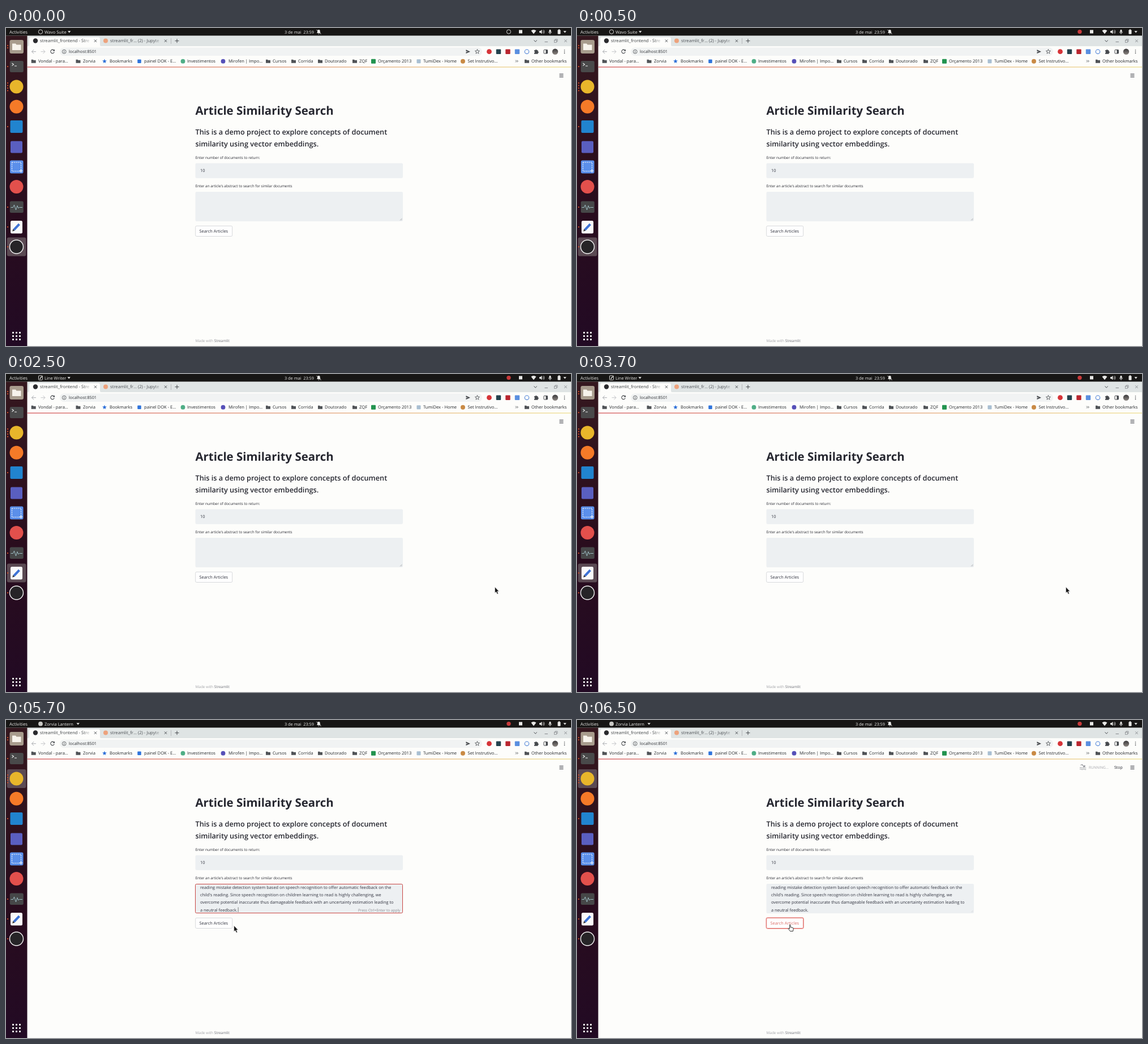
Animation, 998 px wide and 561 px high, one loop 8 s. Source, as an HTML page:

```html
<!DOCTYPE html>
<html lang="en">
<head>
<meta charset="utf-8">
<title>Article Similarity Search</title>
<style>
html, body { margin: 0; width: 100%; height: 100%; overflow: hidden; background: #fdfdfb; }
svg { display: block; width: 100vw; height: 100vh; }
text { font-family: "Open Sans", "Noto Sans", sans-serif; white-space: pre; text-rendering: geometricPrecision; }
</style>
</head>
<body>
<svg id="stage" viewBox="0 0 998 561" preserveAspectRatio="none">
  <defs>
    <linearGradient id="dock" x2="0" y2="1">
      <stop stop-color="#35181f"/><stop offset=".5" stop-color="#2a0d1d"/><stop offset="1" stop-color="#220a24"/>
    </linearGradient>
    <linearGradient id="deco"><stop stop-color="#d0464a"/><stop offset="1" stop-color="#eedd86"/></linearGradient>
    <linearGradient id="photo" x2="0" y2="1"><stop stop-color="#3b3a3c"/><stop offset="1" stop-color="#8b8580"/></linearGradient>
    <linearGradient id="fadeA" gradientUnits="userSpaceOnUse" x1="136" x2="150">
      <stop stop-color="#3c4043"/><stop offset="1" stop-color="#3c4043" stop-opacity="0"/>
    </linearGradient>
    <linearGradient id="fadeB" gradientUnits="userSpaceOnUse" x1="261" x2="275">
      <stop stop-color="#4b4f54"/><stop offset="1" stop-color="#4b4f54" stop-opacity="0"/>
    </linearGradient>
    <clipPath id="area"><rect x="335" y="289.5" width="365.5" height="51"/></clipPath>
  </defs>
</svg>
<script>
const stage = document.getElementById("stage");
let layer = stage;

function add(tag, attrs, content) {
  const el = document.createElementNS(stage.namespaceURI, tag);
  for (const k in attrs) el.setAttribute(k, attrs[k]);
  if (content) el.textContent = content;
  layer.appendChild(el);
  return el;
}
const box = (x, y, width, height, fill, rx = 0, more = {}) => add("rect", { x, y, width, height, fill, rx, ...more });
const frame = (x, y, w, h, stroke, sw = 1, rx = 0, more = {}) => box(x, y, w, h, "none", rx, { stroke, "stroke-width": sw, ...more });
const disc = (cx, cy, r, fill, more = {}) => add("circle", { cx, cy, r, fill, ...more });
const ring = (cx, cy, r, stroke, w = 1) => disc(cx, cy, r, "none", { stroke, "stroke-width": w });
const line = (d, stroke, w = 1) => add("path", { d, stroke, fill: "none", "stroke-width": w });
const shape = (d, fill, more = {}) => add("path", { d, fill, ...more });
const text = (x, y, size, fill, str, weight = 400) =>
  add("text", { x, y, fill, "font-size": size, "font-weight": weight }, str);
const square = (x, y, s, fill, rx = 1) => box(x - s / 2, y - s / 2, s, s, fill, rx);
const cross = (x, y, r, color) => line(`M${x - r} ${y - r}l${2 * r} ${2 * r}m0 ${-2 * r}l${-2 * r} ${2 * r}`, color, .9);
const folder = (x, y) => shape(`M${x - 4} ${y - 3}h3l1 1h4v5h-8z`, "#505357");
const triangle = x => shape(`M${x} 5.3h5.4l-2.7 3.2z`, bright);

function star(x, y, r, fill, stroke = "none") {
  const pts = [];
  for (let i = 0; i < 10; i++) {
    const a = i * Math.PI / 5 - Math.PI / 2, q = i % 2 ? r * .42 : r;
    pts.push((x + q * Math.cos(a)).toFixed(2) + "," + (y + q * Math.sin(a)).toFixed(2));
  }
  add("polygon", { points: pts.join(" "), fill, stroke, "stroke-width": .8 });
}

const bright = "#e9e9e7", ink = "#262730", body = "#31333f", grey = "#45484c", paper = "#fdfdfb", field = "#edf0f2";

function topBar() {
  box(0, 0, 998, 13.7, "#171615");
  text(6, 9.7, 7.8, bright, "Activities", 500);
  text(492, 9.7, 7.35, bright, "3 de mai  23:59", 500);
  shape("M549 9c1-1 1-2 1-3.5a2.4 2.4 0 0 1 4.8 0c0 1.5 0 2.5 1 3.5zM551.5 9.8h1.8v1h-1.8z", bright);
  line("M548.5 3l8 8", bright, .9);
  square(909, 6.5, 6, bright, 0);
  shape("M927.5 4.8a6.3 6.3 0 0 1 9 0l-4.5 5.7z", bright);
  shape("M942 5.2h2l2.5-2.2v7.5l-2.5-2.2h-2z", bright);
  line("M948 4.5a3 3 0 0 1 0 4.5M949.5 3.2a5 5 0 0 1 0 7", bright, .8);
  box(959.5, 2.7, 3, 5.2, bright, 1.5);
  line("M958.3 6.5a2.7 2.7 0 0 0 5.4 0M961 9.2v1.8", bright, .8);
  box(974.5, 3.3, 5, 7.5, bright, .7);
  box(976, 2.2, 2, 1.2, bright);
  triangle(984.5);
}

function dock() {
  box(0, 13.7, 37.7, 548, "url(#dock)");
  const mark = box(1.8, 0, 33.6, 33, "#5b4a53", 3);
  box(6.5, 21, 24.5, 24, "#a89c8d", 3);
  shape("M11 27.5h6l1.5 2h8v9.5h-15.5z", "#f7f3ec");
  box(6.8, 58, 24, 20, "#49494a", 2.5);
  line("M10.5 62l3 2.3-3 2.3M15 67h4", "#f0f0f0", 1.1);
  disc(18.5, 103.5, 12, "#e8b62b");
  disc(18.5, 138.8, 12, "#f57a28");
  square(18.5, 174, 22, "#2184cf", 2);
  square(18.5, 210, 21, "#5a5fc0", 2);
  box(7, 233.5, 23.5, 23, "#5b8fea", 2.5);
  frame(10.5, 237, 16, 15.5, "#fff", 1, 0, { "stroke-dasharray": "2 1.4" });
  line("M26.5 249v6M23.5 252h6", "#fff", 1.2);
  disc(18.5, 280, 12, "#e2504c");
  box(6.8, 305.5, 24, 20.5, "#464748", 2.5);
  line("M8.5 316.5h4l2-4.5 3 9 2.5-7.5 2 4.5 1.5-1.5h5.5", "#a9cbd3", .9);
  box(8, 340, 21, 22.5, "#fafafa", 2.5);
  line("M14 356l9.5-10", "#3e73d6", 4);
  shape("M11.2 358.7l1.2-4.2 3 2.9z", "#333");
  disc(18.5, 386, 12, "#262427", { stroke: "#f1f1f1", "stroke-width": 1.4 });
  for (let i = 0; i < 9; i++) square(12.5 + i % 3 * 6, 537.5 + Math.floor(i / 3) * 6, 3, "#f3f1f2", .7);
  for (const y of [31, 35, 68, 97, 101.5, 106, 110.5, 174, 316, 351, 386]) disc(3, y, 1.1, "#e4572a");
  return mark;
}

function tabs() {
  box(37.7, 13.7, 961, 18.5, "#dfe4e4");
  shape("M38 32.3c2.5 0 3-1 3-3v-10q0-3 3-3h119q3 0 3 3v10c0 2 .5 3 3 3z", paper);
  disc(52, 22.5, 4.2, "#2a2a2d");
  text(60, 25.2, 7.7, "url(#fadeA)", "streamlit_frontend - Stre");
  cross(158, 22.7, 2.2, grey);
  disc(176, 22.5, 4, "#eda27c");
  text(184, 25.2, 7.7, "url(#fadeB)", "streamlit_fr… (2) - Jupyte");
  cross(282, 22.7, 2.2, grey);
  box(291.3, 18, .6, 10, "#9a9da1");
  line("M298.5 22.7h7M302 19.2v7", grey);
  line("M932.5 21.5l2.7 2.7 2.7-2.7", grey);
  const pale = "#85888c";
  line("M951.5 24.5h5.5", pale);
  frame(968.5, 21.5, 3.8, 3.8, pale, .8);
  line("M970 21.2v-1.3h4v4h-1.3", pale, .8);
  cross(988.5, 22.7, 2.3, pale);
}

function toolbar() {
  box(37.7, 32.2, 961, 36.5, paper);
  box(95, 34.5, 746, 14.5, "#f1f3f3", 7.2);
  line("M53 41.7h-7.5m3.5-3.5l-3.5 3.5 3.5 3.5", "#a9acb0");
  line("M61.5 41.7h7.5m-3.5-3.5l3.5 3.5-3.5 3.5", "#c3c5c8");
  line("M85 39.7a3.3 3.3 0 1 0 .3 2.7", grey, 1.1);
  shape("M86 37.5v3.3h-3.3z", grey);
  ring(102.7, 41.7, 3.4, grey, .8);
  line("M102.7 41v2.7M102.7 39.5v.9", grey, .9);
  text(111, 44.3, 7.28, "#2b2e32", "localhost:8501");
  shape("M812.5 38.3l7.5 3.4-7.5 3.4v-2.7l4-.7-4-.7z", grey);
  star(832.5, 41.7, 4.2, "none", grey);
  disc(853.5, 41.7, 4.4, "#d63438");
  square(870, 41.7, 8.4, "#24434e");
  square(886.5, 41.7, 8.4, "#b9262f");
  square(903, 41.7, 8.4, "#5a8fe0");
  ring(920, 41.7, 3.7, "#4f83d8", 1.1);
  shape("M933 39.2h2a1.3 1.3 0 0 1 2.6 0h2v2.2a1.3 1.3 0 0 1 0 2.6v1.8h-6.6v-2.2a1.2 1.2 0 0 0 0-2.4z", grey);
  frame(950, 38.5, 6.5, 6.5, grey, 1, .8);
  box(953.5, 38.5, 3, 6.5, grey);
  disc(970, 41.7, 5.2, "url(#photo)");
  for (const y of [39, 41.7, 44.4]) disc(986.5, y, .8, grey);
}

function bookmarks() {
  const marks = [
    [57, "Vondal - para…"], [136, "Zorvia"], [183, "Bookmarks"], [244, "painel DOK - E…"],
    [320, "Investimentos"], [393, "Mirofen | Impo…"], [471, "Cursos"], [516, "Corrida"],
    [563, "Doutorado"], [624, "ZQF"], [657, "Orçamento 2013"], [737, "TumiDex - Home"],
    [815.5, "Set Instrutivo…"], [928, "Other bookmarks"]
  ];
  for (const [x, name] of marks) text(x, 61.3, 7.6, "#26292d", name);
  for (const x of [48.7, 127.5, 463, 508, 555, 616, 920]) folder(x, 58.7);
  star(174, 58.7, 4.2, "#2d6fd8");
  square(235.5, 58.7, 6.5, "#2f74dc");
  disc(312.5, 58.7, 3.9, "#4fae86");
  disc(383.5, 58.7, 3.9, "#5650b8");
  square(649, 58.7, 8, "#23934f");
  square(729, 58.7, 7, "#a9bfd2");
  disc(807, 58.7, 4, "#c98a45");
  line("M900 56.7l1.8 1.8-1.8 1.8M902.6 56.7l1.8 1.8-1.8 1.8", grey, .9);
}

function page() {
  box(37.7, 68.7, 961, 493, paper);
  box(37.7, 68.3, 961, 1.2, "url(#deco)");
  for (const y of [81.2, 83.8, 86.4]) box(977.5, y - .5, 7, 1, "#3b3d45");
  text(334.5, 152.9, 20.4, ink, "Article Similarity Search", 700);
  text(334.5, 188.4, 12.73, ink, "This is a demo project to explore concepts of document", 600);
  text(334.5, 208.5, 12.73, ink, "similarity using vector embeddings.", 600);
  text(334.5, 231, 6.4, ink, "Enter number of documents to return:");
  box(334.5, 238.5, 366.5, 26.2, field, 2);
  text(343, 253.9, 7.4, body, "10");
  text(334.5, 281, 6.4, ink, "Enter an article's abstract to search for similar documents");
  box(334.5, 289, 366.5, 52, field, 2);
  const made = text(334.5, 553.5, 6.45, "#a3a4a9", "Made with ");
  made.appendChild(add("tspan", { fill: "#6c6e76" }, "Streamlit"));
}

function abstract() {
  layer.setAttribute("clip-path", "url(#area)");
  [
    "reading mistake detection system based on speech recognition to offer automatic feedback on the",
    "child's reading. Since speech recognition on children learning to read is highly challenging, we",
    "overcome potential inaccurate thus damageable feedback with an uncertainty estimation leading to",
    "a neutral feedback."
  ].forEach((s, i) => text(343, 297.7 + i * 13.3, 7.38, body, s));
}
function focused() {
  frame(334.5, 289.5, 366, 51, "#c94643", 1, 2);
  box(409.8, 330.3, .6, 8.7, "#333");
  text(622, 337.5, 6.48, "#85878d", "Press Ctrl+Enter to apply");
}
function button(stroke, color) {
  box(334.7, 349.2, 65, 18.3, "#fefefe", 2, { stroke, "stroke-width": .9 });
  text(341.5, 360.9, 7.43, color, "Search Articles");
}
function running() {
  const c = "#8c8e94";
  disc(896.5, 81.5, 1.4, c);
  line("M889.5 79.5l3-.8 3 4.3", c, 1.2);
  for (const y of [84.3, 87]) line(`M888 ${y}q1.4-1.3 2.8 0t2.8 0 2.8 0 2.8 0`, c, .9);
  text(904, 86, 6.46, "#a6a7ac", "RUNNING...");
  text(949, 86, 7, ink, "Stop");
}
function pressed() {
  frame(333.9, 348.4, 66.6, 19.9, "#f3aaa6", 1, 2.5);
  button("#d9534f", "#dc6f6a");
  running();
}
const grip = color => line("M696 339.3l3.5-3.5M698 339.3l1.5-1.5", color, .7);
const arrow = (x, y) =>
  shape(`M${x} ${y}v10.5l2.3-2.1 1.8 4 1.9-.8-1.8-3.9h3.1z`, "#161616", { stroke: "#f4f4f4", "stroke-width": .6 });
const hand = (x, y) =>
  shape(`M${x} ${y}q1.1-.7 1.6.4v3.7l3.9.8q1.4.5 1.1 2l-.7 4.2h-5l-3.3-4.4q.2-1.2 1.4-.7l1 .9z`,
    "#fff", { stroke: "#1b1b1b", "stroke-width": .9, "stroke-linejoin": "round" });

const mixIcon = () => ring(61, 6.7, 3.7, bright, .9);
const webIcon = () => disc(61, 6.7, 3.9, "#c9c9c5");
function noteIcon() {
  frame(57.5, 3, 7, 7.5, bright, .9, 1);
  line("M59.5 8.8l4-4.5", bright, 1.3);
}
function app(icon, name, x) {
  icon();
  text(68, 9.7, 7.5, bright, name, 500);
  triangle(x);
}

topBar();
const mark = dock();
tabs();
toolbar();
bookmarks();
page();

const parts = [];
// Draws a part that is visible only in the listed steps
function during(steps, draw) {
  const g = layer = add("g", {});
  draw();
  layer = stage;
  parts.push({ g, steps });
}
during([0, 1], () => app(mixIcon, "Wavo Suite", 109));
during([2], () => app(noteIcon, "Line Writer", 108.5));
during([3, 4], () => app(webIcon, "Zorvia Lantern", 124.5));
during([0], () => ring(888, 6.6, 3.6, bright, .9));
during([1, 2, 3, 4], () => disc(888, 6.6, 3.7, "#c93a3b"));
during([3, 4], abstract);
during([0, 1, 2], () => grip("#9a9ca0"));
during([4], () => grip("#cfd1d4"));
during([3], focused);
during([0, 1, 2, 3], () => button("#d3d5d8", body));
during([4], pressed);
during([2], () => arrow(863.5, 375.8));
during([3], () => arrow(402.7, 362.8));
during([4], () => hand(375.6, 361.5));

const starts = [0, 500, 2500, 4500, 6500];
const marked = [386, 386, 351, 103.5, 103.5];
const loop = 8000;
const began = performance.now();
let shown = -1;

function tick(now) {
  const t = Math.max(0, now - began) % loop;
  const step = starts.filter(s => s <= t).length - 1;
  if (step !== shown) {
    shown = step;
    for (const { g, steps } of parts) g.style.display = steps.includes(step) ? "" : "none";
    mark.setAttribute("y", marked[step] - 16.5);
  }
  requestAnimationFrame(tick);
}
tick(began);
</script>
</body>
</html>
```
